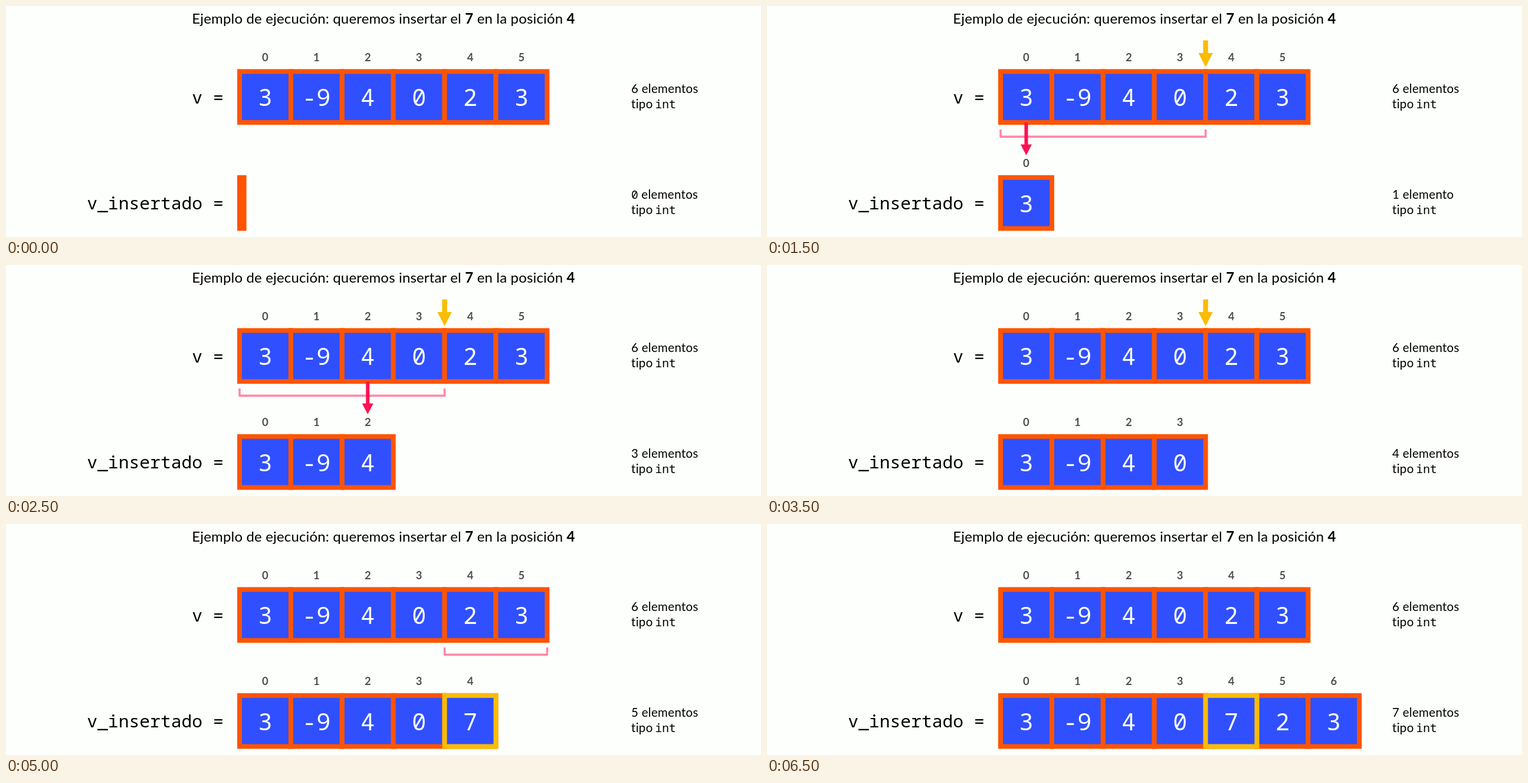
Recreate the animation shown at these times as an HTML page. Size 1280 by 393 pixels, loop 7500 ms.

```html
<!DOCTYPE html>
<html lang="es">
<head>
<meta charset="utf-8">
<title>Insertar en un vector</title>
<style>
  html, body { margin: 0; width: 100%; height: 100%; overflow: hidden; background: #fdfffc; }
  svg { display: block; width: 1280px; height: 393px; }
  text { font-family: Lato, sans-serif; font-size: 20.5px; letter-spacing: .3px; }
  .mono { font-family: "Noto Sans Mono", monospace; font-size: 19.6px; letter-spacing: 0; }
  .title { font-size: 24px; letter-spacing: .16px; text-anchor: middle; }
  .name { font-size: 29.7px; text-anchor: end; }
  .index { font-size: 18.5px; font-weight: bold; letter-spacing: 0; fill: #505050; text-anchor: middle; }
  .value { font-size: 40px; fill: #fdfffc; text-anchor: middle; }
</style>
</head>
<body>
<svg id="stage" viewBox="0 0 1280 393"></svg>
<script>
const ORANGE = '#ff5400', YELLOW = '#fabc05', BLUE = '#3050ff', RED = '#ff1053', PINK = '#ff88a8';
const LEFT = 396, TOP = 111.4, WIDTH = 86.9, HEIGHT = 86.7, BORDER = 8, ROW = 180.4;
const STEP = 500, LOOP = 7500, INSERT_AT = 4;
const source = [3, -9, 4, 0, 2, 3];
const inserted = [3, -9, 4, 0, 7, 2, 3];
const sizeAtStep = [0, 0, 0, 1, 2, 3, 4, 4, 5, 5, 5, 6, 7, 7];

const stage = document.getElementById('stage');
const edgeX = i => LEFT + WIDTH * i;
const centerX = i => edgeX(i + .5);
const text = (cls, x, y, content) => `<text class="${cls}" x="${x}" y="${y}">${content}</text>`;

const box = (x, y, width, color) =>
  `<rect x="${x}" y="${y + TOP}" width="${width}" height="${HEIGHT}"
    fill="${BLUE}" stroke="${color}" stroke-width="${BORDER}"/>`;

function vector(name, values, y, marked) {
  const count = values.length;
  const digit = count ? count : '<tspan class="mono">0</tspan>';
  let out = text('mono name', 368.8, y + 166, name + ' =')
    + text('', 1060, y + 148, `${digit} elemento${count === 1 ? '' : 's'}`)
    + text('', 1060, y + 173.5, 'tipo') + text('mono', 1100.5, y + 173.5, 'int');
  if (!count) out += box(LEFT, y, BORDER - .4, ORANGE);
  values.forEach((_, i) => out += box(edgeX(i), y, WIDTH, ORANGE));
  if (marked < count) out += box(edgeX(marked), y, WIDTH, YELLOW);
  values.forEach((value, i) => {
    out += text('index', centerX(i), y + 93.8, i) + text('mono value', centerX(i), y + 170.3, value);
  });
  return out;
}

function arrow(x1, y1, x2, y2, color, width, head, half) {
  const length = Math.hypot(x2 - x1, y2 - y1);
  const angle = Math.atan2(y2 - y1, x2 - x1) * 180 / Math.PI;
  const neck = length - head, w = width / 2;
  return `<path fill="${color}" transform="translate(${x1} ${y1}) rotate(${angle})"
    d="M0 ${-w}H${neck}V${-half}L${length} 0L${neck} ${half}V${w}H0Z"/>`;
}

const insertArrow = (y1, y2) => arrow(edgeX(INSERT_AT), y1, edgeX(INSERT_AT), y2, YELLOW, 8.4, 24, 12.2);
const copyArrow = (from, to) => arrow(centerX(from), 198.3, centerX(to), 254, RED, 6, 18.5, 9.5);
const bracket = (from, to) =>
  `<path d="M${edgeX(from)} 210V222.4H${edgeX(to)}V210" fill="none" stroke="${PINK}"
    stroke-width="3.6" stroke-linejoin="round"/>`;

function draw(step) {
  const count = sizeAtStep[step];
  let out = text('title', 640, 30,
    'Ejemplo de ejecución: queremos insertar el <tspan font-weight="bold">7</tspan>'
    + ' en la posición <tspan font-weight="bold">4</tspan>');
  out += vector('v', source, 0) + vector('v_insertado', inserted.slice(0, count), ROW, INSERT_AT);

  if (step >= 1 && step <= 7) out += insertArrow(58.5, 104);
  if (step >= 2 && step <= 6) out += bracket(0, 4);
  if (step >= 3 && step <= 6) out += copyArrow(count - 1, count - 1);
  if (step === 8) out += insertArrow(111.2, 283.3);
  if (step >= 10 && step <= 12) out += bracket(4, 6);
  if (step === 11 || step === 12) out += copyArrow(count - 2, count - 1);
  stage.innerHTML = out;
}

let shown = -1;
function tick() {
  const step = Math.min(Math.floor(performance.now() % LOOP / STEP), sizeAtStep.length - 1);
  if (step !== shown) draw(shown = step);
  requestAnimationFrame(tick);
}
tick();
</script>
</body>
</html>
```
